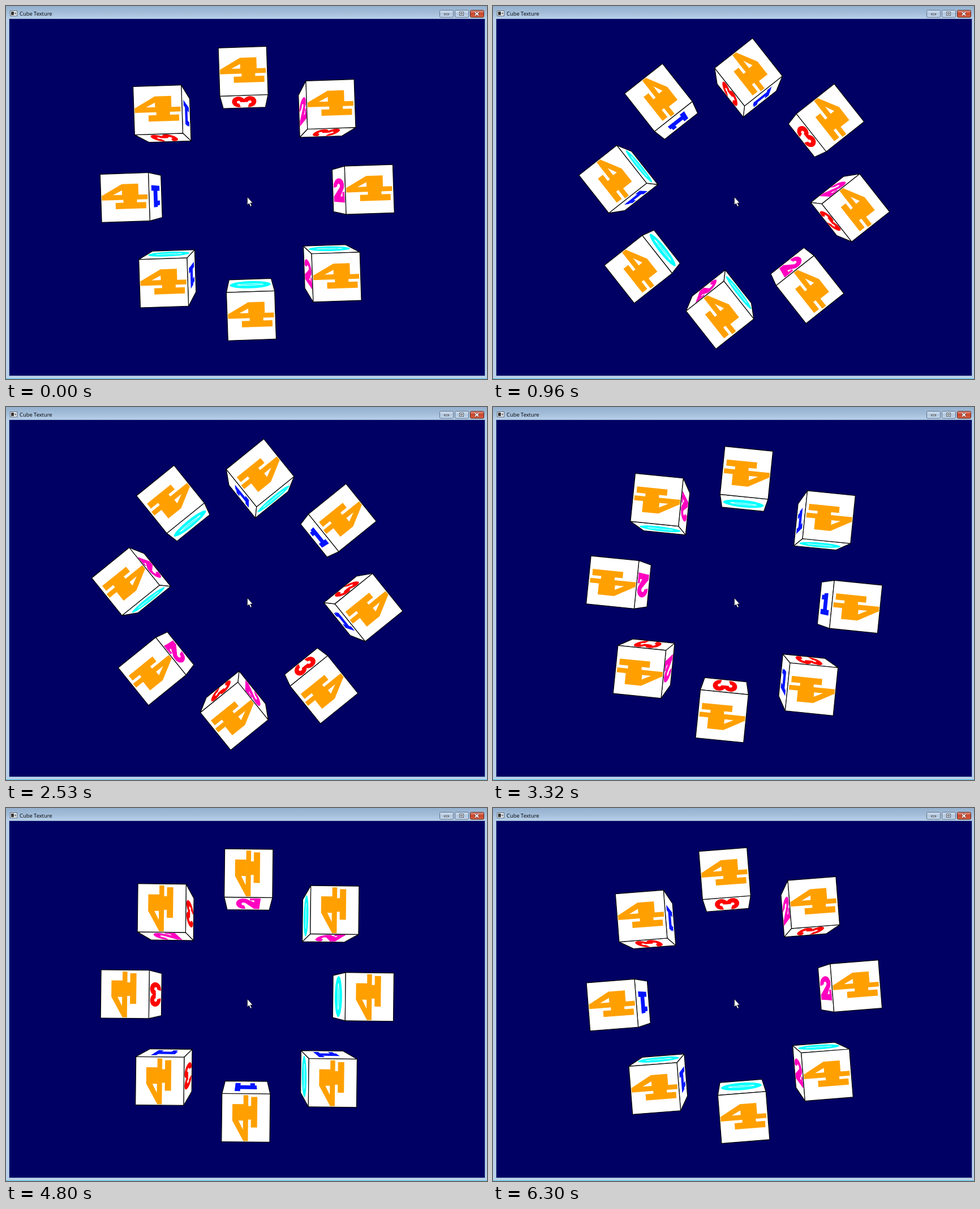
Recreate the animation shown at these times as an HTML page with a canvas. Size 850 by 659 pixels, loop 6380 ms.

```html
<!DOCTYPE html>
<html lang="en">
<head>
<meta charset="utf-8">
<title>Cube Texture</title>
<style>
  html, body { margin: 0; width: 100%; height: 100%; overflow: hidden; background: #b9d1ea; }
  canvas { display: block; }
</style>
</head>
<body>
<canvas id="stage" width="850" height="659"></canvas>
<script>
const ctx = document.getElementById('stage').getContext('2d');
const RAD = Math.PI / 180;

// The scene turns by a fixed angle at each of the loop's equal steps.
const LOOP = 6380, STEPS = 81, LEAD = 5;
const STEP_ANGLE = 4.468, START_ANGLE = -1.9;

// Sizes in pixels at the depth of the front faces.
const CENTER_X = 426.3, CENTER_Y = 331.3, RADIUS = 216.1, HALF = 42.6, FOCAL = 584;

// Shapes on a cube face, measured from its centre.
const bar = (x0, y0, x1, y1) => [[x0, y0], [x1, y0], [x1, y1], [x0, y1]];

function arc(cx, cy, rx, ry, from = 0, to = 360, pieces = 24) {
  return Array.from({ length: pieces + 1 }, (_, i) => {
    const a = (from + (to - from) * i / pieces) * RAD;
    return [cx + rx * Math.cos(a), cy + ry * Math.sin(a)];
  });
}

// Part of a thick elliptical ring.
const band = (cx, cy, rx, ry, from, to) =>
  [...arc(cx, cy, rx, ry, from, to), ...arc(cx, cy, rx * .27, ry * .27, to, from)];

const SQUARE = bar(-HALF, -HALF, HALF, HALF);

// Each digit: solid parts, white cut-outs, then parts inside the cut-outs.
const DIGITS = {
  zero: { color: '#00ffff',
    solid: [arc(-3, 0, 25, 39)],
    cut: [arc(-3, 0, 6.5, 26)],
    inner: [arc(-3, 0, 3, 20)] },
  one: { color: '#0014ff',
    solid: [bar(-28, 11, 27, 21), bar(-12, -20, 14, 12), bar(-28, -17, -10, -8)] },
  two: { color: '#ff00c0',
    solid: [band(0, -9, 35, 14, 165, 400), [[8, -6], [34, -5], [10, 12], [-35, 12]],
      bar(-35, 11, 36, 22), bar(24, 3, 36, 22)] },
  three: { color: '#ff0000',
    solid: [band(0, -10.5, 36, 12.5, 165, 450), band(0, 10.5, 37, 12.5, -90, 195)] },
  four: { color: '#ffa000',
    solid: [[[-41, -4], [-5, -24], [24, -24], [24, -4]], bar(-41, -4.5, 40, 4),
      bar(-3, 3, 21, 10), bar(-17, 9, 37, 20)],
    cut: [[[-21, -5], [-5, -5], [-5, -13]]] }
};

const SIDES = [
  { nx: 1, ny: 0, digit: DIGITS.one },
  { nx: -1, ny: 0, digit: DIGITS.two },
  { nx: 0, ny: 1, digit: DIGITS.three },
  { nx: 0, ny: -1, digit: DIGITS.zero }
];

function trace(points) {
  ctx.beginPath();
  points.forEach(p => ctx.lineTo(...p));
  ctx.closePath();
}

function fill(color, points) {
  trace(points);
  ctx.fillStyle = color;
  ctx.fill();
}

function drawFace({ color, solid, cut = [], inner = [] }, place) {
  const paint = (shade, shapes) => shapes.forEach(s => fill(shade, s.map(place)));
  paint('#fff', [SQUARE]);
  paint(color, solid);
  paint('#fff', cut);
  paint(color, inner);
  trace(SQUARE.map(place));
  ctx.stroke();
}

function drawCube(x, y) {
  for (const { nx, ny, digit } of SIDES) {
    if (nx * x + ny * y + HALF >= 0) continue; // faces away from the viewer
    drawFace(digit, ([u, v]) => {
      const scale = FOCAL / (FOCAL + HALF - u);
      return [(x + nx * HALF + ny * v) * scale, (y + ny * HALF - nx * v) * scale];
    });
  }
  drawFace(DIGITS.four, ([u, v]) => [x + u, y + v]);
}

function drawRing(angle) {
  ctx.save();
  ctx.translate(CENTER_X, CENTER_Y);
  ctx.rotate(angle * RAD);
  ctx.strokeStyle = '#000';
  ctx.lineWidth = 1.2;
  ctx.lineJoin = 'round';
  for (let a = 0; a < 360; a += 45) {
    drawCube(RADIUS * Math.cos(a * RAD), RADIUS * Math.sin(a * RAD));
  }
  ctx.restore();
}

function rect(color, x, y, w, h) {
  ctx.fillStyle = color;
  ctx.fillRect(x, y, w, h);
}

function gradient(y0, y1, ...colors) {
  const g = ctx.createLinearGradient(0, y0, 0, y1);
  colors.forEach((c, i) => g.addColorStop(i / (colors.length - 1), c));
  return g;
}

function drawButton(x, border, ...colors) {
  ctx.beginPath();
  ctx.roundRect(x + .5, 7.5, 24, 12.5, 2);
  ctx.fillStyle = gradient(7, 20, ...colors);
  ctx.fill();
  ctx.strokeStyle = border;
  ctx.stroke();
}

function framedBox(x, y, w, h) {
  rect('#fff', x, y, w, h);
  ctx.strokeStyle = '#4c5663';
  ctx.strokeRect(x, y, w, h);
}

function drawCross(color, width) {
  ctx.strokeStyle = color;
  ctx.lineWidth = width;
  ctx.beginPath();
  for (const side of [-3, 3]) {
    ctx.moveTo(832 - side, 11);
    ctx.lineTo(832 + side, 16.5);
  }
  ctx.stroke();
}

function drawWindow() {
  rect('#b9d1ea', 0, 0, 850, 659);
  rect(gradient(0, 23, '#94b0ce', '#a3bdd9', '#b9d1ea'), 0, 0, 850, 23);
  rect('#45c3e6', 0, 658, 850, 1);
  rect('#8fa9c4', 5, 22, 842, 632);
  rect('#000064', 6, 23, 840, 630);

  rect('#5f6b78', 7, 8, 13, 10);
  rect('#fff', 8, 9, 11, 8);
  rect('#333', 9, 10, 5, 6);
  rect('#8a949e', 15, 11, 3, 4);
  ctx.fillStyle = '#000';
  ctx.font = '9.4px "Open Sans", "Noto Sans", sans-serif';
  ctx.fillText('Cube Texture', 24, 17);

  ctx.lineWidth = 1;
  for (const x of [766, 793]) drawButton(x, '#63758a', '#d4e2f1', '#b3c8df', '#c4d7eb');
  drawButton(820, '#5b2822', '#e7a291', '#c8452b', '#d86443');
  framedBox(774.5, 13.5, 8, 2);
  framedBox(801.5, 10.5, 7, 6);
  framedBox(803.5, 12.5, 3, 2);
  drawCross('#5b3038', 3.6);
  drawCross('#fff', 1.8);
}

function drawCursor() {
  fill('#fff', [[426.5, 337.5], [426.5, 351.5], [429.5, 348.8], [432, 354.2],
    [434.3, 353.2], [431.8, 348], [436, 348]]);
  ctx.lineWidth = .7;
  ctx.strokeStyle = '#000';
  ctx.stroke();
}

function draw() {
  const time = performance.now() % LOOP;
  const step = Math.floor((time + LEAD) * STEPS / LOOP) % STEPS;
  drawWindow();
  drawRing(START_ANGLE + step * STEP_ANGLE);
  drawCursor();
  requestAnimationFrame(draw);
}
draw();
</script>
</body>
</html>
```
